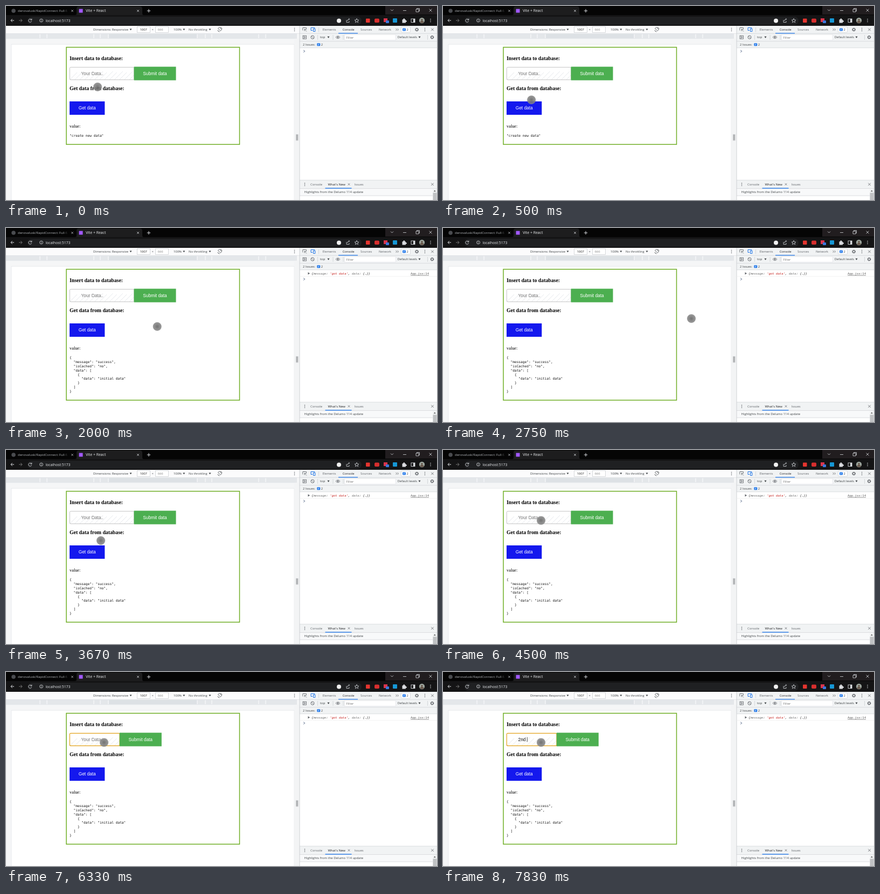
Animation, 800 px wide and 362 px high, one loop 8 s. Source, as an HTML page:

```html
<!DOCTYPE html>
<html lang="en">
<head>
<meta charset="utf-8">
<title>Data form demo</title>
<style>
html, body { margin: 0; width: 100%; height: 100%; overflow: hidden; background: #fff; }
svg { display: block; width: 800px; height: 362px; }
text { white-space: pre; font-family: "Open Sans", "Noto Sans", sans-serif; }
.serif { font-family: "Liberation Serif", serif; }
.bold { font-weight: bold; }
.arial { font-family: "Liberation Sans", sans-serif; }
.mono { font-family: "DejaVu Sans Mono", monospace; }
.log { font-family: "Liberation Mono", monospace; }
</style>
</head>
<body>
<svg id="stage" viewBox="0 0 800 362"></svg>
<script>
const LOOP = 8000, STEP = 1000 / 12;
const GRAY = '#5f6368', INK = '#3c4043', BAR = '#f1f3f4', LINE = '#cdd0d4', BLUE = '#1a73e8';

const text = (x, y, s, size, fill, cls = '') =>
  `<text x="${x}" y="${y}" font-size="${size}" fill="${fill}" class="${cls}">${s}</text>`;
const rect = (x, y, w, h, fill, more = '') =>
  `<rect x="${x}" y="${y}" width="${w}" height="${h}" fill="${fill}" ${more}/>`;
const path = (d, stroke, w = 0.8, fill = 'none') =>
  `<path d="${d}" stroke="${stroke}" stroke-width="${w}" fill="${fill}"/>`;
const circle = (x, y, r, fill, more = '') =>
  `<circle cx="${x}" cy="${y}" r="${r}" fill="${fill}" ${more}/>`;
const cross = (x, y, r, c) => path(`M${x - r} ${y - r}l${2 * r} ${2 * r}m0 ${-2 * r}l${-2 * r} ${2 * r}`, c);
const arrow = (x, y, c = INK) => path(`M${x} ${y}h4l-2 3.2z`, 'none', 0, c);
const dots = (x, y, c) => [-2.4, 0, 2.4].map(d => circle(x, y + d, 0.75, c)).join('');
const gear = (x, y) => circle(x, y, 2.6, 'none', `stroke="${GRAY}" stroke-width="1.5" stroke-dasharray="1.4 .65"`) +
  circle(x, y, 2, 'none', `stroke="${GRAY}" stroke-width=".9"`);
const badge = (x, y) => rect(x, y - 3, 6, 5, BLUE, 'rx="1"') +
  path(`M${x + 1.2} ${y - 1.2}h3.6m-3.6 1.5h2.5`, '#fff', 0.6);

function browser() {
  const white = '#dadce0';
  return rect(0, 0, 800, 37, '#050505') +
    rect(704, 0, 96, 16, '#211d1f') +
    path('M128 17q3 0 3-3V5q0-4 4-4h114q4 0 4 4v9q0 3 3 3z', 'none', 0, '#1d1d1e') +
    rect(0, 17, 800, 20, '#141415') +
    rect(40, 20, 620, 15, '#1f2022', 'rx="7.5"') +
    circle(14, 9, 3.8, '#4a4c50') +
    text(22, 11.3, 'denovalusk/RapidConnect: Full-S', 6.05, '#b4b7bb') +
    rect(106, 2, 10, 13, 'url(#fade)') + cross(123, 9, 1.9, '#b4b7bb') +
    rect(135.5, 5.5, 7, 7, '#a259ff') +
    text(148, 11.3, 'Vite + React', 6.9, '#eceef0') + cross(245, 9, 1.9, white) +
    path('M265 5.8v6.4m-3.2-3.2h6.4', white, 1) +
    path('M714 6.5l2.5 2.5 2.5-2.5M737 8.5h6M761 6h5v5h-5zM762.5 6v-1.4h5V9.5h-1.4', white, 0.8) +
    cross(788, 8, 2.5, white) +
    path('M15 27h-6m2.7-2.8L8.9 27l2.8 2.8', white, 1) +
    path('M24 27h6m-2.7-2.8l2.8 2.8-2.8 2.8', '#777', 1) +
    path('M47.3 25.6a3 3 0 1 0 .3 2.7M47.8 23.6v2.5h-2.6', white, 0.9) +
    circle(65.5, 27, 3, 'none', `stroke="${white}" stroke-width=".8"`) +
    path('M65.5 26.7v2m0-3.6v.8', white, 0.8) +
    text(73.5, 29.8, 'localhost:5173', 6.8, '#e8eaed') +
    circle(618, 27.5, 4, '#f0f0f0') +
    path('M632 26v4.5h5V28M633.5 28q.5-3.5 4-3.5m-1.4-1.5l1.6 1.5-1.6 1.6', white) +
    path('M651 23.4l1.1 2.6 2.8.2-2.1 1.8.7 2.7-2.5-1.5-2.5 1.5.7-2.7-2.1-1.8 2.8-.2z', white) +
    rect(668, 23.5, 7.5, 7.5, '#e5352f', 'rx="1"') + rect(684, 23.5, 9, 7.5, '#d62e2e', 'rx="2"') +
    rect(701, 23, 7, 7, '#d9344c') + rect(705, 27, 6, 5, '#3978dd', 'rx="1"') +
    rect(718, 23, 8, 8, '#1697d5', 'rx="1"') +
    path('M735.5 25.2h2a1.4 1.4 0 1 1 2.6 0h1.8v2a1.4 1.4 0 1 1 0 2.4v1.9h-6.4z', 'none', 0, white) +
    rect(752, 24, 7, 6.5, 'none', `stroke="${white}" stroke-width=".9"`) + rect(756, 24, 3, 6.5, white) +
    circle(772, 27, 5.2, '#9aa39b') + circle(772, 26, 1.8, '#655347') +
    path('M768 30q4-4.5 8 0q-4 3.6-8 0z', 'none', 0, '#655347') + dots(788, 27, white);
}

function deviceBar() {
  const ticks = [63, 76, 163, 175, 190].map(x => `M${x} 52.5v7.5M${545 - x} 52.5v7.5`).join('');
  return rect(0, 37, 545, 325, '#f5f6f7') + rect(0, 37, 545, 14.5, '#fbfbfc') +
    text(162, 46.3, 'Dimensions: Responsive', 5.75, INK) + arrow(229.5, 42.4) +
    rect(243.5, 38.5, 24, 11, '#fff', `stroke="${LINE}" stroke-width=".8"`) +
    text(248.5, 46.3, '1007', 5.9, '#222') + text(270.5, 46.3, '×', 6, GRAY) +
    rect(277.5, 38.5, 24, 11, '#fff', `stroke="${LINE}" stroke-width=".8"`) +
    text(281.5, 46.3, '666', 5.9, '#888') +
    text(311, 46.3, '100%', 5.9, INK) + arrow(328.3, 42.4) +
    text(339, 46.3, 'No throttling', 5.85, INK) + arrow(376.5, 42.4) +
    path('M393.5 42l2.5-2.5 4.5 4.5-2.5 2.5zM393 45q.5 3 3.5 3M401 43q-.5-3-3.5-3', INK, 0.8) +
    dots(535.5, 44, GRAY) +
    rect(0, 51.5, 540, 9, '#e4e7ea') + rect(190, 52.5, 165, 7.5, '#dde1e5') +
    path(ticks, '#f8f9fa', 1.2) + path('M0 51.5h545M0 60.8h540', '#d8dbdf', 0.6) +
    rect(10, 71.5, 525, 291, '#fff', 'stroke="#e2e4e7" stroke-width=".7"') +
    rect(535.3, 61, 9.7, 301, '#f3f4f5') + rect(538, 239, 4.5, 12.5, '#d7d9dc') +
    path('M539.2 240v10.5M541.3 240v10.5', '#777', 0.7);
}

function devTools() {
  return rect(545, 37, 255, 325, '#fff') + rect(545, 37, 255, 41, BAR) +
    path('M545 51.3h255M545 65.8h255M545 78h255', LINE, 0.7) +
    path('M551 40.5h4M550.7 40.5v5M551.5 40.5h6v3M554 43.5l4 4m-4-4v3.2m0-3.2h3.2', GRAY) +
    path('M566 40.5h7v1M566 40.5v5h3M570.5 42.5h3.3v5h-3.3z', BLUE, 1) +
    path('M580.5 40v8.5', LINE) +
    text(587.5, 46.4, 'Elements', 5.8, GRAY) + text(624.7, 46.4, 'Console', 5.8, '#202124') +
    rect(617, 50.3, 36, 1.2, BLUE) +
    text(658, 46.4, 'Sources', 5.8, GRAY) + text(692, 46.4, 'Network', 5.8, GRAY) +
    path('M723.5 42l2 2-2 2m3-4l2 2-2 2', GRAY) +
    rect(733.5, 39, 17, 10, '#fff', `stroke="${LINE}" stroke-width=".7" rx="1"`) +
    badge(736, 44.5) + text(743.6, 46.3, '2', 5.9, INK) +
    gear(762.5, 44) + dots(777.5, 44, GRAY) + cross(791.5, 44, 2.3, GRAY) +
    rect(551, 55.3, 6.5, 6, 'none', `stroke="${GRAY}" stroke-width=".8"`) +
    path('M553 55.3v6M554.3 57l2 1.3-2 1.3z', GRAY, 0.7) +
    circle(569, 58.3, 3.1, 'none', `stroke="${GRAY}" stroke-width=".9"`) +
    path('M566.9 56.2l4.2 4.2', GRAY) + path('M578.5 54v9M607 54v9M626 54v9M782.5 54v9', LINE) +
    text(583, 60.4, 'top', 5.9, INK) + arrow(596.5, 56.7) +
    path('M612 58.3q4-4.8 8 0q-4 4.8-8 0z', GRAY) + circle(616, 58.3, 1.3, GRAY) +
    rect(628.5, 53.3, 95, 10.5, '#fff', 'stroke="#e0e2e5" stroke-width=".7"') +
    text(631.5, 60.6, 'Filter', 6, '#757575') +
    text(726.7, 60.4, 'Default levels', 5.8, INK) + arrow(765.5, 56.7) + gear(791, 58.3) +
    text(551, 74.3, '2 Issues:', 5.8, INK) + badge(577.2, 72.6) + text(584.7, 74.3, '2', 5.9, INK) +
    rect(545, 325, 255, 15.5, BAR) + rect(545, 340.5, 255, 13.5, '#f8f9fa') +
    path('M545 325h255M545 340.6h255M545 354h247', LINE, 0.7) +
    dots(554.5, 332.8, GRAY) + text(565, 335, 'Console', 5.9, GRAY) +
    text(597.5, 335, "What's New", 5.9, '#202124') + cross(636.5, 332.7, 1.8, GRAY) +
    rect(592.5, 339.4, 49, 1.3, BLUE) + text(646.5, 335, 'Issues', 5.9, GRAY) +
    cross(791.5, 332.7, 2.3, GRAY) +
    text(553.5, 349.2, 'Highlights from the Delumo 114 update', 5.95, INK) +
    rect(792, 341, 8, 21, BAR) + path('M793.8 346.2l2-2.6 2 2.6z', 'none', 0, '#666') +
    rect(792.5, 348.5, 7, 14, '#bfc1c3') +
    path('M545 37v325', '#c4c7cb', 0.8);
}

const RESULT = ['{', '  "message": "success",', '  "isCached": "no",', '  "data": [', '    {',
  '      "data": "initial data"', '    }', '  ]', '}'];

function form() {
  const stripes = Array.from({ length: 13 }, (_, i) => `M${118 + i * 9.2} 138l${14 + i % 2 * 2} ${-14 - i % 2 * 2}`).join('');
  return rect(112, 77, 321.5, 181, 'none', 'id="frame" stroke="#6fae25" stroke-width="1.5"') +
    text(118, 101, 'Insert data to database:', 9.77, '#000', 'serif bold') +
    text(118, 157, 'Get data from database:', 9.77, '#000', 'serif bold') +
    `<g clip-path="url(#field)">${path(stripes, '#dfe1e6', 0.8)}</g>` +
    rect(118.3, 114.3, 119.4, 23.4, 'none', 'id="input" rx="2"') +
    text(139.5, 128.8, '', 8.35, '#000', 'arial').replace('<text', '<text id="typed"') +
    rect(0, 121.5, 0.7, 9, '#000', 'id="caret"') +
    `<g id="submit">${rect(237.5, 113.3, 78, 25.3, '#4caf50')}${text(254.2, 128.8, 'Submit data', 8.35, '#fff', 'arial')}</g>` +
    rect(118, 178, 65.3, 25, '#1418ee') + text(134.7, 193, 'Get data', 8.35, '#fff', 'arial') +
    text(118, 227, 'value:', 8.35, '#000', 'serif') +
    `<g id="before">${text(118, 243.7, '"create new data"', 6.2, '#111', 'mono')}</g>` +
    `<g id="after">${RESULT.map((s, i) => text(118, 243.7 + i * 7.95, s, 6.2, '#111', 'mono')).join('')}` +
    path('M560.5 82.6v4.4l3.5-2.2z', 'none', 0, '#5f6368') +
    text(567, 87, `{<tspan fill="#6b6b6b">message</tspan>: <tspan fill="#c41a16">'got data'</tspan>, <tspan fill="#6b6b6b">data</tspan>: {…}}`,
      5.68, '#333', 'log').replace('<text', '<text font-style="italic"') +
    text(751, 87, 'App.jsx:14', 5.68, '#555', 'log').replace('<text', '<text text-decoration="underline"') +
    path('M545 90.3h255', '#ececec', 0.7) + '</g>' +
    `<g id="prompt">${path('M552.2 82.4l2.6 2-2.6 2', '#45587c', 0.9)}</g>`;
}

const stage = document.getElementById('stage');
stage.innerHTML = `<defs>
  <linearGradient id="fade"><stop stop-color="#050505" stop-opacity="0"/><stop offset="1" stop-color="#050505"/></linearGradient>
  <radialGradient id="halo"><stop stop-color="#5c5c5c"/><stop offset=".5" stop-color="#777"/>
    <stop offset=".88" stop-color="#858585"/><stop offset="1" stop-color="#999" stop-opacity=".3"/></radialGradient>
  <clipPath id="field"><rect id="fieldBox" x="118" y="121" height="16.5"/></clipPath></defs>` +
  deviceBar() + devTools() + browser() + form() +
  `<g id="cursor"><g id="idle">${circle(0, 0, 8.4, 'url(#halo)', 'opacity=".86"')}</g>
   <g id="press">${circle(0, 0, 7.4, '#30304c', 'fill-opacity=".55" stroke="#8c8b70" stroke-width=".9"')}
   ${path('M-1.5 -3v5l-2-1 3 4.5h4v-5z', '#111', 0.6, '#333')}</g></g>`;

const el = id => document.getElementById(id);
const set = (id, attrs) => { for (const k in attrs) el(id).setAttribute(k, attrs[k]); };
const show = (id, on) => set(id, { visibility: on ? 'visible' : 'hidden' });
const clamp = v => Math.max(0, Math.min(1, v));
const smooth = v => v * v * (3 - 2 * v);

// time, x, y
const ROUTE = [[0, 170, 151], [830, 161, 188], [1800, 161, 188], [2250, 448, 178], [2500, 448, 178], [2750, 461, 169],
  [3080, 461, 169], [3600, 176, 169], [3700, 176, 169], [4080, 180, 134], [4250, 182, 131.5], [LOOP, 182, 131.5]];
const KEYS = [[7000, '2'], [7330, '2n'], [7670, '2nd'], [7830, '2nd ']];
const CARET_X = { '': 139.5, '2': 144.2, '2n': 148.8, '2nd': 153.4, '2nd ': 155.8 };
const FOCUS = 4830, LOADED = 1500;

function cursorAt(t) {
  const i = Math.max(1, ROUTE.findIndex(p => p[0] >= t));
  const [a, b] = [ROUTE[i - 1], ROUTE[i]];
  const k = smooth((t - a[0]) / (b[0] - a[0]));
  return [a[1] + (b[1] - a[1]) * k, a[2] + (b[2] - a[2]) * k];
}

function draw(now) {
  const t = Math.floor((now % LOOP + 4) / STEP) * STEP;
  const loaded = t >= LOADED - 4, focused = t >= FOCUS - 4;

  set('frame', { height: loaded ? 244.3 : 181.3 });
  show('before', !loaded);
  show('after', loaded);
  set('prompt', { transform: `translate(0 ${loaded ? 11 : 0})` });

  const shrink = 26.7 * smooth(clamp((t - FOCUS) / 400));
  set('input', { width: 119.4 - shrink, stroke: focused ? '#e3a21a' : '#bdbdbd', 'stroke-width': focused ? 1.2 : 0.9 });
  set('fieldBox', { width: 119.5 - shrink });
  set('submit', { transform: `translate(${-shrink} 0)` });

  const typed = KEYS.filter(k => t >= k[0] - 4).map(k => k[1]).pop() || '';
  el('typed').textContent = typed || 'Your Data..';
  set('typed', { fill: typed ? '#111' : '#757575' });
  set('caret', { x: CARET_X[typed] });
  show('caret', focused && (typed || Math.floor((t - FOCUS + 4) / 500) % 2 === 0));

  const pressed = t > 1080 && t < 1420;
  show('idle', !pressed);
  show('press', pressed);
  set('cursor', { transform: `translate(${cursorAt(t)})` });
}

const start = performance.now();
function tick() {
  draw(performance.now() - start);
  requestAnimationFrame(tick);
}
tick();
</script>
</body>
</html>
```
